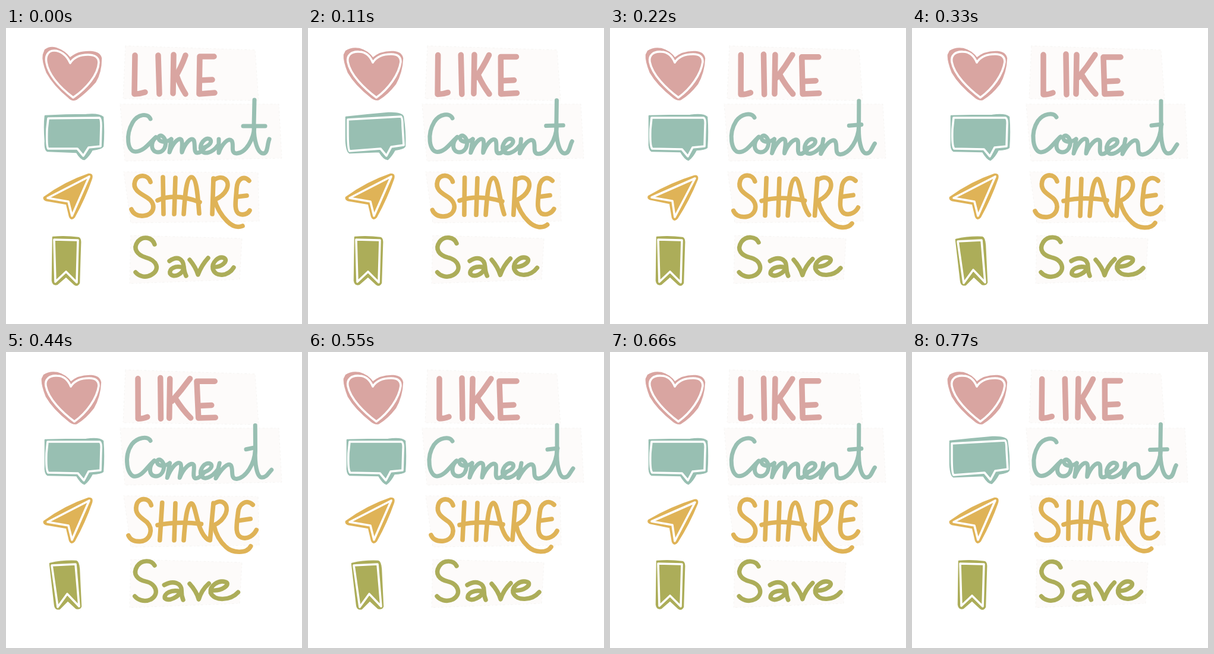
These frames come from a looping animation (498 px wide and 498 px high, 0.88 s). An HTML page:

```html
<!DOCTYPE html>
<html lang="en">
<head>
<meta charset="utf-8">
<title>Like, comment, share, save</title>
<style>
html, body { margin: 0; width: 100%; height: 100%; overflow: hidden; background: #fff; }
svg { display: block; width: 100vw; height: 100vh; }
path { stroke-linecap: round; stroke-linejoin: round; }
.card { fill: #fdfbfa; stroke: #f3f1ef; stroke-width: .8; stroke-dasharray: 1 5 3 4; }
</style>
</head>
<body>
<svg viewBox="0 0 498 498" id="stage"></svg>
<script>
const STEP = 110;
const SEQUENCE = [0, 1, 2, 3, 4, 3, 2, 1];
const BLEND = [0, .42, .82, 1, 1.25];
const PINK = '#d9a5a1', TEAL = '#98bfb2', GOLD = '#dfb357', OLIVE = '#acad59';

const cards = [
  'M201 30L419 37L425 122L197 119Z',
  'M192 128L459 128L464 219L200 224Z',
  'M198 242L424 243L426 325L210 328Z',
  'M210 349L397 354L393 423L208 430Z'
];

// Each stroke is a pair: relaxed shape, stretched shape.
const words = [
  { color: PINK, width: 9.5, strokes: [
    ['M217 46L216 111Q225 111 234 108', 'M221 45L221 112Q230 112 237 109'],
    ['M256 46L258 111', 'M259 44L260 112'],
    ['M282 45L281 110', 'M277 45L276 111'],
    ['M302 46Q295 66 284 84', 'M308 45Q295 65 280 83'],
    ['M287 80Q293 97 302 111', 'M285 78Q296 97 309 111'],
    ['M350 48L326 48L325 111L351 109', 'M351 49L322 49L324 111L352 110'],
    ['M326 88L347 87', 'M324 90L346 89']
  ] },
  { color: TEAL, width: 7, strokes: [
    ['M243 153C239 143 222 144 213 159C201 180 204 208 218 208C232 208 241 193 252 184',
     'M243 150C238 141 221 144 212 156C198 177 204 209 217 209C230 209 239 192 250 183'],
    ['M252 184C242 194 244 209 256 209C269 209 273 189 263 182C256 178 253 189 263 191Q271 192 278 187',
     'M249 184C240 194 241 209 253 209C266 209 271 189 261 182C254 178 251 189 261 191Q269 192 276 187'],
    ['M278 187L275 209C280 195 290 183 295 188C298 193 295 204 296 209C301 195 311 182 316 189C319 196 315 210 322 210C328 210 331 205 335 201',
     'M276 187L272 211C278 195 289 182 294 188C297 193 293 204 293 211C299 196 311 183 316 190C318 197 313 212 320 212C326 212 330 206 334 202'],
    ['M328 202C338 201 349 193 343 187C335 182 325 196 328 205C333 215 348 209 356 198',
     'M328 203C338 202 350 194 344 188C335 183 325 197 328 207C333 217 347 210 356 198'],
    ['M358 187L358 210C363 196 374 183 380 190C384 197 377 211 388 211C404 210 417 187 418 165',
     'M359 187L354 212C362 197 374 184 379 191C383 199 377 213 388 213C404 211 418 188 419 165'],
    ['M418 121L417 165C417 189 423 211 433 211C441 211 439 196 443 187',
     'M419 123L419 165C418 187 422 211 431 211C439 211 441 202 446 196'],
    ['M399 165L436 165', 'M403 164Q420 162 440 165']
  ] },
  { color: GOLD, width: 7.6, strokes: [
    ['M243 259C239 246 221 245 217 258C212 272 227 279 237 285C255 296 249 315 231 316C220 317 213 311 211 305',
     'M244 258C240 244 222 245 219 258C215 273 228 279 237 286C250 298 244 316 228 318C217 319 210 315 207 308'],
    ['M264 251L265 313', 'M263 253L260 316'],
    ['M285 252L283 313', 'M285 254L283 316'],
    ['M255 290Q284 277 326 293', 'M255 291Q288 283 328 290'],
    ['M299 313C301 284 303 251 312 251C321 251 323 287 325 312',
     'M299 316C301 287 304 254 312 254C320 254 321 300 337 315'],
    ['M349 253L347 313', 'M349 254L344 316'],
    ['M349 256C365 245 378 257 371 272C366 282 358 286 351 289C355 304 362 315 372 325C382 335 390 336 398 333',
     'M349 256C364 245 376 257 370 272C365 283 357 288 350 291C353 304 358 316 370 327C381 338 402 339 409 328'],
    ['M409 257C400 247 389 254 388 270C387 289 383 305 391 312C398 316 407 313 410 307',
     'M414 257C404 247 391 255 390 270C388 289 384 307 395 312C405 316 415 309 419 301'],
    ['M388 284L405 282', 'M389 284L410 281']
  ] },
  { color: OLIVE, width: 7.4, strokes: [
    ['M250 364C246 352 231 349 222 359C212 372 222 382 235 386C254 391 260 406 245 415C233 422 222 416 218 411',
     'M250 360C245 350 229 349 221 360C212 374 222 383 235 386C253 390 259 407 244 416C232 422 221 416 217 411'],
    ['M275 392C289 382 298 389 299 401Q300 411 303 417', 'M268 392C283 383 296 389 296 401Q296 410 299 417'],
    ['M298 403C285 399 274 405 276 413C282 422 298 414 299 403',
     'M294 403C280 399 267 406 269 414C276 421 292 412 295 403'],
    ['M309 390Q319 402 323 415Q329 399 340 387', 'M309 390Q320 402 324 416Q329 400 341 389'],
    ['M349 402C362 403 375 392 367 387C357 383 346 395 348 405C352 420 374 418 383 403',
     'M346 401C363 403 378 391 369 387C357 383 343 394 345 405C351 420 377 418 389 404']
  ] }
];

// Icon looks are [rim, inner line]; order picks one for each pose.
const icons = [
  { color: PINK, order: [0, 1, 1, 1, 1], looks: [
    ['M66 37Q74 31 84 34Q99 39 108 51Q120 39 143 40Q158 41 160 51Q160 75 150 91Q135 108 118 120Q112 123 106 117Q81 97 69 75Q61 55 63 45Z',
     'M108 59C102 45 91 38 81 38C70 38 66 48 68 58C72 80 92 101 113 117C135 102 155 79 156 58C156 48 147 45 138 45C122 45 113 51 108 59Z'],
    ['M64 39Q73 33 86 35Q101 39 109 51Q122 39 144 40Q157 41 159 51Q158 75 147 94Q134 111 119 120Q113 122 106 116Q80 96 68 75Q60 55 61 45Z',
     'M109 58C104 46 96 40 86 40C73 39 65 46 67 57C71 79 95 102 115 117C136 102 153 78 156 57C156 47 149 44 140 44C124 44 114 50 109 58Z']
  ] },
  { color: TEAL, order: [0, 1, 2, 2, 2], looks: [
    ['M66 148Q100 146 135 146Q156 144 163 150Q165 175 163 199Q161 203 145 205Q139 216 132 221Q126 221 119 209L70 207Q65 205 66 190Q64 165 66 148Z',
     'M71 152L157 151Q160 152 160 165L159 199L139 201L130 215L120 203L71 203Q68 200 69 170Z'],
    ['M64 150Q100 146 135 143Q157 142 160 149Q164 175 163 199Q161 203 146 205Q140 216 134 221Q128 221 120 208L70 210Q65 208 64 190Z',
     'M67 154L156 149Q159 150 159 165L161 197L140 200L132 215L122 203L70 207Q67 204 67 175Z'],
    ['M66 148Q100 147 135 147Q157 144 163 150Q165 175 163 201Q160 204 145 205Q139 217 132 222Q126 220 119 208L70 207Q65 204 66 190Z',
     'M70 151L157 151Q161 152 160 165L159 199L139 201L131 216L121 204L71 203Q67 199 68 170Z']
  ] },
  { color: GOLD, order: [0, 0, 1, 0, 0], looks: [
    ['M64 285Q100 259 139 246Q146 245 144 253Q133 285 115 318Q110 324 107 317L102 296L67 290Q63 288 64 285Z',
     'M70 286L140 250L111 316L105 292Z'],
    ['M65 283Q103 261 142 249Q148 248 147 254Q133 289 113 320Q108 326 105 319L101 295L67 288Q63 286 65 283Z',
     'M70 285L143 253L109 318L105 291Z']
  ] },
  { color: OLIVE, order: [0, 0, 0, 1, 1], looks: [
    ['M79 352Q100 350 122 353Q126 354 125 365L123 429Q120 435 115 431L101 418L86 431Q79 433 78 425Z',
     'M81 356L121 357L119 428L101 410L83 427Z'],
    ['M74 356Q95 351 118 352Q122 353 123 365L126 428Q124 433 118 431L104 418L90 432Q83 434 82 425Z',
     'M77 359L117 357L123 428L103 407L87 429Z']
  ] }
];

const stage = document.getElementById('stage');

function addPath(attributes) {
  const path = document.createElementNS('http://www.w3.org/2000/svg', 'path');
  for (const name in attributes) path.setAttribute(name, attributes[name]);
  return stage.appendChild(path);
}

function mix(from, to, amount) {
  const ends = to.match(/\d+/g);
  let i = 0;
  return from.replace(/\d+/g, n => (+n + (ends[i++] - n) * amount).toFixed(2));
}

cards.forEach(d => addPath({ d, class: 'card' }));

const updates = [];
for (const { color, order, looks } of icons) {
  const rim = addPath({ fill: color, stroke: color, 'stroke-width': 2.5 });
  const line = addPath({ fill: color, stroke: '#fff', 'stroke-width': 3.6 });
  updates.push(pose => {
    const [outer, inner] = looks[order[pose]];
    rim.setAttribute('d', outer);
    line.setAttribute('d', inner);
  });
}
for (const { color, width, strokes } of words) {
  for (const [from, to] of strokes) {
    const path = addPath({ fill: 'none', stroke: color, 'stroke-width': width });
    updates.push(pose => path.setAttribute('d', mix(from, to, BLEND[pose])));
  }
}

const start = performance.now();
let shown = -1;
function draw() {
  const beat = Math.floor((performance.now() - start) / STEP) % SEQUENCE.length;
  const pose = SEQUENCE[beat];
  if (pose !== shown) updates.forEach(update => update(pose));
  shown = pose;
  requestAnimationFrame(draw);
}
draw();
</script>
</body>
</html>
```
